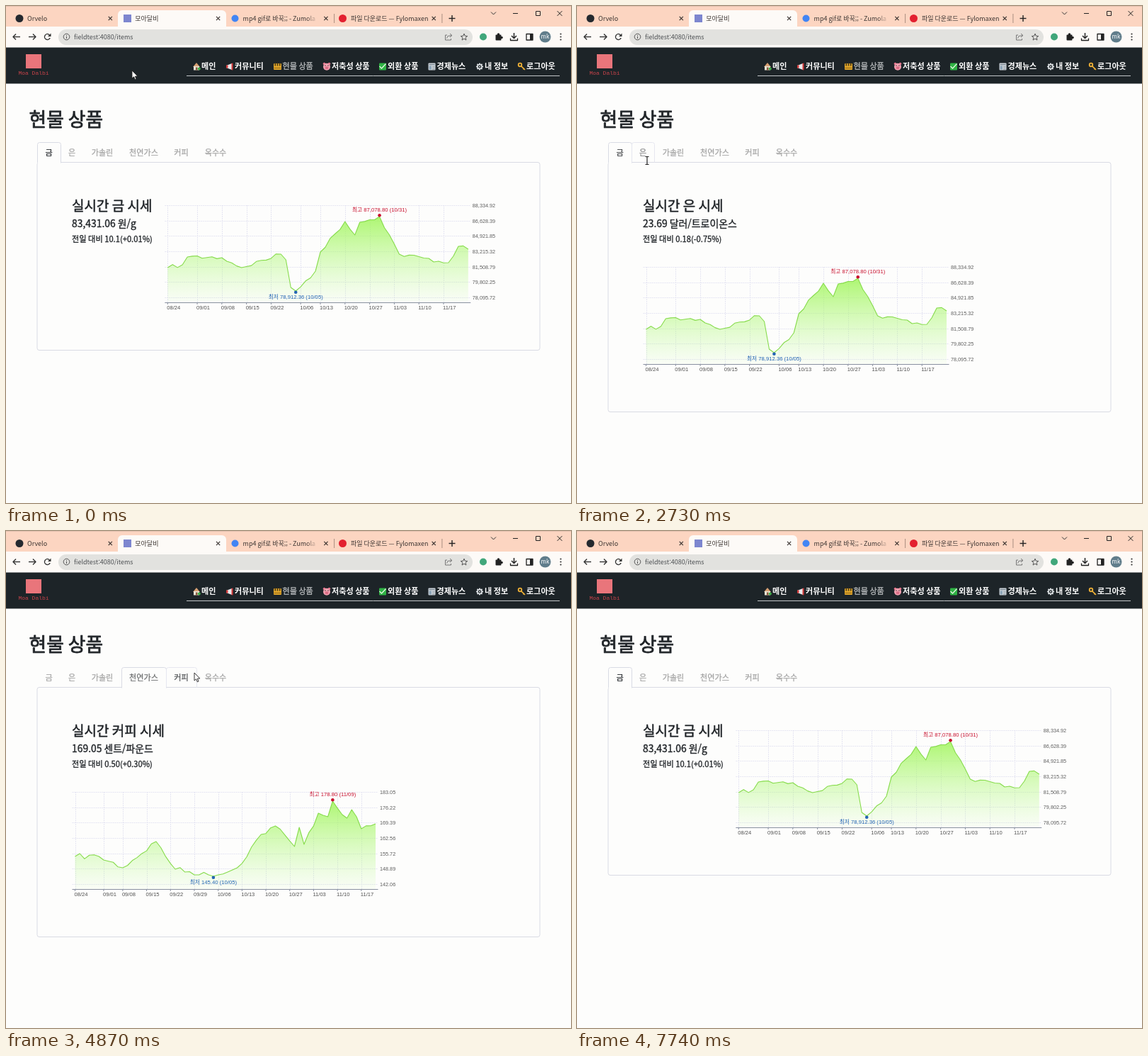
An HTML page with a canvas for the animation above (7780 ms loop, 798x701 px).

```html
<!DOCTYPE html>
<html lang="ko">
<head>
<meta charset="utf-8">
<title>모아달비</title>
<style>
html, body { margin: 0; width: 100%; height: 100%; overflow: hidden; background: #fdfdfc; }
canvas { display: block; width: 798px; height: 701px; }
</style>
</head>
<body>
<canvas id="stage"></canvas>
<script>
const W = 798, H = 701, LOOP = 7780;
const canvas = document.getElementById('stage');
const g = canvas.getContext('2d');
const ratio = window.devicePixelRatio || 1;
canvas.width = W * ratio;
canvas.height = H * ratio;

const KR = '"Noto Sans CJK KR", "Noto Sans CJK", "Noto Sans", sans-serif';
const ARIAL = '"Liberation Sans", "Noto Sans CJK KR", sans-serif';
const INK = '#212529', EDGE = '#d9dbe4', PAPER = '#fdfdfc';

// ---------- drawing helpers ----------
function text(s, x, y, size, color, { font = KR, weight = 400, align = 'left', heft = 0 } = {}) {
  if (font === KR) y -= size * 0.03;
  g.font = `${weight} ${size}px ${font}`;
  g.textAlign = align;
  g.textBaseline = 'middle';
  g.fillStyle = color;
  g.fillText(s, x, y);
  if (heft) {
    g.strokeStyle = color;
    g.lineWidth = heft;
    g.lineJoin = 'round';
    g.strokeText(s, x, y);
  }
}
function box(x, y, w, h, color, r = 0) {
  g.fillStyle = color;
  g.beginPath();
  g.roundRect(x, y, w, h, r);
  g.fill();
}
function dot(x, y, r, color) {
  g.fillStyle = color;
  g.beginPath();
  g.arc(x, y, r, 0, Math.PI * 2);
  g.fill();
}
function ring(x, y, r, color, width = 1, from = 0, to = Math.PI * 2) {
  g.strokeStyle = color;
  g.lineWidth = width;
  g.beginPath();
  g.arc(x, y, r, from, to);
  g.stroke();
}
function trace(pts) {
  g.beginPath();
  for (let i = 0; i < pts.length; i += 2) g.lineTo(pts[i], pts[i + 1]);
}
function line(pts, color, width = 1) {
  trace(pts);
  g.strokeStyle = color;
  g.lineWidth = width;
  g.stroke();
}
function poly(pts, color) {
  trace(pts);
  g.fillStyle = color;
  g.fill();
}
function cross(x, y, r, color, width) {
  line([x - r, y - r, x + r, y + r], color, width);
  line([x - r, y + r, x + r, y - r], color, width);
}

// ---------- browser frame ----------
function drawBrowser() {
  const peach = '#fcd5c1', ink = '#3c3532';
  box(0, 0, W, 29, peach);
  box(0, 0, W, 1, '#e6c2b0');
  box(158, 6, 153, 24, '#fdfaf7', [6, 6, 0, 0]);
  box(0, 29, W, 30, '#fdfaf7');

  dot(19, 17.5, 5.5, '#24292f');
  box(166, 12, 11, 11, '#7d86cf');
  dot(323.5, 17.5, 5, '#4285f4');
  dot(475.5, 17.5, 5.5, '#e3202f');

  const fade = g.createLinearGradient(424, 0, 440, 0);
  fade.addColorStop(0, ink);
  fade.addColorStop(1, peach);
  const titles = ['Orvelo', '모아달비', 'mp4 gif로 바꾹;; - Zumola 검', '파일 다운로드 — Fylomaxen'];
  titles.forEach((title, i) => {
    const x = 30 + i * 152.3;
    text(title, x, 17.5, 9, i === 2 ? fade : ink);
    cross(x + 117.3, 17.5, 2.6, ink, 1.2);
    if (i > 1) line([x + 129, 11, x + 129, 24], '#a98e80');
  });
  line([625.5, 17.5, 634.5, 17.5], '#222', 1.4);
  line([630, 13, 630, 22], '#222', 1.4);

  line([685, 8.5, 688.5, 12, 692, 8.5], '#333');
  line([716, 10.5, 723, 10.5], '#222');
  g.strokeStyle = '#222';
  g.strokeRect(748.5, 7.5, 6, 6);
  cross(782, 10.5, 3.4, '#222', 1);

  for (const [x, d] of [[15, -1], [37, 1]]) {
    line([x - 5 * d, 43.5, x + 4.5 * d, 43.5], '#333', 1.4);
    line([x + d, 39.5, x + 5 * d, 43.5, x + d, 47.5], '#333', 1.4);
  }
  ring(58.5, 43.5, 4, '#333', 1.4, 0.4, 5.5);
  poly([63.5, 38.5, 63.5, 43, 59, 43], '#333');

  box(74, 33, 585, 22, '#e2e2df', 11);
  ring(85.5, 43.5, 4.3, '#555');
  line([85.5, 42.8, 85.5, 46], '#555');
  box(85, 41, 1, 1, '#555');
  text('fieldtest:4080/items', 96, 43.5, 9, '#4c4f52');

  line([623, 41, 620.5, 41, 620.5, 48, 628.5, 48, 628.5, 46], '#777');
  line([622.5, 45.5, 624, 42.5, 629.5, 41.5], '#777');
  line([627, 39, 630, 41.5, 627, 44], '#777');
  const star = [];
  for (let i = 0; i <= 10; i++) {
    const a = i * Math.PI / 5 - Math.PI / 2, r = i % 2 ? 2.2 : 5;
    star.push(647 + r * Math.cos(a), 44 + r * Math.sin(a));
  }
  line(star, '#555');

  dot(674, 43.5, 5, '#41a77b');
  box(691.5, 40.5, 8, 8, '#222', 1);
  dot(695.5, 40, 1.8, '#222');
  dot(700, 44.5, 1.8, '#222');
  line([717.5, 38, 717.5, 45], '#222', 1.5);
  line([714, 42, 717.5, 45.5, 721, 42], '#222', 1.5);
  line([712.5, 45.5, 712.5, 48.5, 722.5, 48.5, 722.5, 45.5], '#222', 1.3);
  g.lineWidth = 1.3;
  g.strokeStyle = '#222';
  g.strokeRect(735, 39.5, 9, 8.5);
  box(740, 39.5, 4, 8.5, '#222');
  dot(761.5, 43.5, 8, '#607d8b');
  text('mk', 761.5, 43.5, 8, '#fff', { align: 'center' });
  for (let i = -1; i < 2; i++) dot(783.5, 43.5 + i * 4, 1.1, '#333');
}

// ---------- site header ----------
const icons = {
  house(x) {
    poly([x - 5, 86, x, 80, x + 5, 86], '#d8a073');
    box(x - 4, 85, 8, 5.5, '#e8e2d4');
    box(x - 1, 86.5, 2.5, 4, '#8b5a3c');
    dot(x + 3.8, 88.5, 2, '#3fae4a');
  },
  horn(x) {
    poly([x - 5, 84, x + 3, 81, x + 3, 90, x - 5, 87], '#e9e9ec');
    box(x - 5, 83.5, 2.5, 4, '#d63a3a');
    box(x + 2.5, 80.5, 2, 10, '#d63a3a', 1);
  },
  crown(x) {
    box(x - 5.5, 81, 11, 9, '#e0a52a', 1);
    for (let i = -1; i < 2; i++) box(x + i * 3.2 - 0.8, 80.5, 1.6, 4, '#4b3a16');
    box(x - 5, 87, 10, 1, '#8d6518');
  },
  pig(x) {
    for (const s of [-1, 1]) dot(x + s * 3.5, 81.5, 1.8, '#e0738a');
    dot(x, 85.8, 5, '#f3a0b0');
    box(x - 2.5, 85.5, 5, 3.4, '#d96b84', 1.7);
    for (const s of [-1, 1]) dot(x + s * 2, 84, 0.7, '#333');
  },
  trend(x) {
    box(x - 5, 80.5, 10, 10, '#2fb344', 1);
    line([x - 4.5, 85, x - 1.5, 88, x + 4.5, 81.5], '#e8f6e6', 1.2);
  },
  news(x) {
    box(x - 5, 80.5, 10, 10, '#cfd6dc', 1);
    box(x - 4, 82, 8, 1.3, '#7b8790');
    box(x - 4, 84.5, 3.5, 5, '#8ea6b8');
    for (let i = 0; i < 3; i++) box(x + 0.5, 85 + 2 * i, 3.5, 0.8, '#8a949b');
  },
  gear(x) {
    for (let a = 0; a < 6; a += Math.PI / 4) dot(x + 4 * Math.cos(a), 85.5 + 4 * Math.sin(a), 1.1, '#dfe3e6');
    ring(x, 85.5, 3, '#dfe3e6', 1.6);
    dot(x, 85.5, 1, '#dfe3e6');
  },
  key(x) {
    ring(x - 2, 83, 2.3, '#eeb036', 1.8);
    line([x - 0.5, 84.7, x + 5, 90], '#eeb036', 1.7);
    line([x + 2.5, 89.5, x + 4, 88], '#eeb036', 1.3);
  }
};
const menu = [
  ['메인', 276, 'house'], ['커뮤니티', 323, 'horn'], ['현물 상품', 390.5, 'crown'], ['저축성 상품', 460, 'pig'],
  ['외환 상품', 539, 'trend'], ['경제뉴스', 608.5, 'news'], ['내 정보', 676, 'gear'], ['로그아웃', 735, 'key']
];
function drawHeader() {
  box(0, 58.5, W, 51, '#1d2428');
  box(28, 68, 22, 20, '#e9757b');
  text('Moa Dalbi', 39, 95, 8, '#c8434a', { font: '"Liberation Mono", monospace', align: 'center' });
  for (const [label, x, icon] of menu) {
    icons[icon](x - 7);
    const here = icon === 'crown';
    text(label, x, 85, 11.1, here ? '#b4b7b9' : '#fff', { weight: here ? 400 : 700, heft: here ? 0.3 : 0 });
  }
  line([255, 98.5, 782, 98.5], '#c3c6c8');
}

// ---------- data ----------
// Trading days from 24 August; Fridays carry the axis labels.
function calendar(count, holidays) {
  const days = [];
  for (const d = new Date(2023, 7, 24); days.length < count; d.setDate(d.getDate() + 1)) {
    const label = [d.getMonth() + 1, d.getDate()].map(v => String(v).padStart(2, '0')).join('/');
    const weekday = d.getDay(), i = days.length;
    if (weekday % 6 === 0 || holidays.includes(label)) continue;
    days.push({ label, tick: i === 0 || (weekday === 5 && i > 1 && i < count - 1) });
  }
  return days;
}
const home = calendar(62, ['09/28', '09/29', '10/02', '10/03', '10/09']);
const world = calendar(64, ['09/04']);

// Daily heights below the top grid line: straight runs between turning points, with seeded noise.
function walk(days, turns, noise) {
  let seed = 7;
  const random = () => (seed = seed * 16807 % 2147483647) / 2147483647;
  const levels = turns.map(p => p[1]);
  const min = Math.min(...levels) + 2, max = Math.max(...levels) - 2;
  return days.map((_, i) => {
    const k = Math.max(1, turns.findIndex(p => p[0] >= i));
    const [i0, y0] = turns[k - 1], [i1, y1] = turns[k];
    const y = y0 + (y1 - y0) * (i - i0) / (i1 - i0);
    if (i === i0 || i === i1) return y;
    return Math.min(max, Math.max(min, y + (random() * 2 - 1) * noise));
  });
}

const goods = [
  { name: '금', price: '83,431.06 원/g', diff: '10.1(+0.01%)', days: home, noise: 3,
    top: 88334.92, low: 78095.72, hi: '87,078.80', lo: '78,912.36',
    turns: [[0, 88], [3, 84], [4, 73], [11, 74], [15, 88], [23, 69], [24, 77], [25, 116], [26, 121], [30, 93],
      [31, 66], [36, 23], [38, 42], [39, 24], [43, 16], [47, 69], [57, 81], [59, 58], [61, 62]] },
  { name: '은', price: '23.69 달러/트로이온스', diff: '0.18(-0.75%)', days: world, noise: 3,
    top: 25.64, low: 20.61, hi: '25.10', lo: '21.02',
    turns: [[0, 36], [2, 35], [4, 14], [9, 62], [14, 67], [20, 47], [25, 83], [26, 109], [29, 120], [30, 102],
      [34, 93], [35, 71], [40, 57], [48, 74], [51, 62], [55, 88], [59, 44], [63, 51]] },
  { name: '가솔린', price: '1,650.91 원/리터', diff: '2.05(-0.12%)', days: home, noise: 1,
    top: 1818.31, low: 1636.42, hi: '1,796.00', lo: '1,650.91',
    turns: [[0, 59], [26, 16], [40, 60], [61, 120]] },
  { name: '천연가스', price: '2.90 달러/MMBtu', diff: '0.06(+2.18%)', days: world, noise: 6,
    top: 3.74, low: 2.38, hi: '3.58', lo: '2.49',
    turns: [[0, 100], [9, 120], [24, 85], [32, 50], [39, 70], [48, 16], [63, 75]] },
  { name: '커피', price: '169.05 센트/파운드', diff: '0.50(+0.30%)', days: world, noise: 4,
    top: 183.051, low: 142.06, hi: '178.80', lo: '145.40',
    turns: [[0, 91], [5, 91], [10, 107], [17, 70], [21, 109], [29, 119], [34, 107], [39, 60], [42, 48], [46, 77],
      [47, 50], [48, 74], [51, 30], [53, 35], [54, 13], [57, 37], [58, 25], [60, 52], [63, 45]] },
  { name: '옥수수', price: '487.75 센트/부셸', diff: '1.25(-0.26%)', days: world, noise: 6,
    top: 511.649, low: 459.899, hi: '505.00', lo: '464.00',
    turns: [[0, 59], [2, 39], [5, 84], [9, 64], [16, 101], [24, 59], [25, 88], [28, 65], [29, 36], [32, 66],
      [34, 39], [37, 57], [39, 18], [43, 69], [49, 105], [50, 86], [55, 120], [56, 87], [60, 112], [63, 61]] }
];
let edge = 44;
for (const item of goods) {
  item.left = Math.round(edge);
  item.right = Math.round(edge += 22.4 + 10.3 * item.name.length);
  item.ys = walk(item.days, item.turns, item.noise);
}

// ---------- chart ----------
const money = v => v.toLocaleString('en-US', { minimumFractionDigits: 2, maximumFractionDigits: 2 });

function mark(x, y, label, color, side, left) {
  dot(x, y + side * 1.8, 2.3, color);
  g.font = `7.7px ${ARIAL}`;
  const half = g.measureText(label).width / 2;
  text(label, Math.max(x, left + 28.5 + half), y + side * 9, 7.7, color, { font: ARIAL, align: 'center' });
}
function drawChart({ ys, days, top, low, hi, lo }, x, y) {
  const n = ys.length - 1, base = y + 137;
  const px = i => x + 4 + 424.5 * i / n;

  g.setLineDash([2, 1]);
  for (let i = 0; i < 7; i++) {
    const gy = Math.round(y + i * 21.67) + 0.5;
    line([x, gy, x + 432, gy], '#e5e5f2');
  }
  days.forEach((day, i) => {
    const gx = Math.round(px(i)) + 0.5;
    if (day.tick) line([gx, y, gx, base], '#e5e5f2');
  });
  g.setLineDash([]);

  const curve = ys.flatMap((v, i) => [px(i), y + v]);
  const fill = g.createLinearGradient(0, y + Math.min(...ys), 0, base);
  fill.addColorStop(0, 'rgba(160,245,90,.85)');
  fill.addColorStop(1, 'rgba(190,250,150,.06)');
  poly([...curve, px(n), base, px(0), base], fill);
  g.lineJoin = 'round';
  line(curve, '#86db4b', 1.1);
  line([x, base + 0.5, x + 432, base + 0.5], '#8990a0', 1.2);

  for (let i = 0; i < 7; i++) {
    text(money(top - (top - low) * i / 6), x + 434.5, y + 1 + i * 21.67, 7.25, '#5d5d5d', { font: ARIAL });
  }
  days.forEach((day, i) => {
    if (!day.tick) return;
    line([px(i), base, px(i), base + 3], '#8990a0');
    text(day.label, px(i) - 1, y + 145.3, 7.6, '#505050', { font: ARIAL });
  });

  const a = ys.indexOf(Math.min(...ys)), b = ys.indexOf(Math.max(...ys));
  mark(px(a), y + ys[a], `최고 ${hi} (${days[a].label})`, '#c8102e', -1, x);
  mark(px(b), y + ys[b], `최저 ${lo} (${days[b].label})`, '#2464b4', 1, x);
}

// ---------- state ----------
const clicks = [2710, 3480, 4130, 4790, 5380, 6040];
const pageAt = t => clicks.filter(at => t >= at).length % goods.length;

const path = [
  [0, 178, 91], [1400, 130, 184], [1730, 126, 192], [2730, 99, 218], [3500, 143, 212],
  [4200, 195, 207], [4870, 266, 200], [5400, 293, 205], [6000, 52, 203], [6330, 52, 204]
];
function cursorAt(t) {
  const k = path.findIndex(p => p[0] > t);
  if (k < 0) return null;
  const [t0, x0, y0] = path[k - 1], [t1, x1, y1] = path[k];
  const u = (t - t0) / (t1 - t0), e = u * u * (3 - 2 * u);
  return { x: x0 + (x1 - x0) * e, y: y0 + (y1 - y0) * e, beam: t > 1530 && t < 3700 };
}
function drawCursor({ x, y, beam }) {
  if (beam) {
    line([x, y - 5, x, y + 5], '#222', 1.2);
    for (const d of [-5.5, 5.5]) line([x - 2.5, y + d, x + 2.5, y + d], '#222');
    return;
  }
  const shape = [0, 0, 0, 11, 2.6, 8.8, 4.3, 12.8, 6, 12, 4.4, 8.2, 7.8, 8, 0, 0]
    .map((v, i) => v + (i % 2 ? y : x));
  poly(shape, '#fff');
  line(shape, '#222', 0.9);
}

// ---------- page ----------
function tabShape(left, right, bottom, color) {
  g.strokeStyle = color;
  g.lineWidth = 1;
  g.beginPath();
  g.moveTo(left + 0.5, bottom);
  g.arcTo(left + 0.5, 192.5, left + 3.5, 192.5, 3);
  g.arcTo(right + 0.5, 192.5, right + 0.5, 196, 3);
  g.lineTo(right + 0.5, bottom);
  g.stroke();
}
// Tab label colour eases over 150 ms after each click.
function tabColor(i, t) {
  let lit = 0;
  for (let k = 0; k < 10; k++) if (pageAt(t - k * 15) === i) lit += 0.1;
  const [r, gr, b] = [[163, 33], [163, 37], [163, 41]].map(([off, on]) => Math.round(off + (on - off) * lit));
  return `rgb(${r},${gr},${b})`;
}
function drawTabs(t, cursor) {
  const active = pageAt(t - 100);
  goods.forEach(({ left, right, name }, i) => {
    const hover = cursor && cursor.x > left && cursor.x < right && cursor.y > 193 && cursor.y < 220;
    if (i === active) {
      box(left, 192, right - left, 30, PAPER, [3, 3, 0, 0]);
      tabShape(left, right, 221.5, EDGE);
    } else if (hover) {
      tabShape(left, right, 220.5, '#e6e7f0');
    }
    text(name, (left + right) / 2, 207, 11.1, tabColor(i, t), { align: 'center', heft: 0.25 });
  });
}

function render(t) {
  const page = pageAt(t), item = goods[page], stacked = page !== 0;
  const chart = goods[pageAt(t - 50)], cursor = cursorAt(t);

  g.setTransform(ratio, 0, 0, ratio, 0, 0);
  box(0, 0, W, H, PAPER);
  drawBrowser();
  drawHeader();

  text('현물 상품', 32.5, 161, 26.8, INK, { heft: 0.8 });
  g.strokeStyle = EDGE;
  g.lineWidth = 1;
  g.beginPath();
  g.roundRect(44, 220.5, 710, stacked ? 352 : 265, 3);
  g.stroke();
  drawTabs(t, cursor);

  text(`실시간 ${item.name} 시세`, 93, 282, 19, INK, { heft: 0.5 });
  text(item.price, 93, 307, 13.9, INK, { heft: 0.35 });
  text('전일 대비 ' + item.diff, 93, 329, 11.2, INK, { heft: 0.3 });
  if (stacked) drawChart(chart, 93.5, 368);
  else drawChart(chart, 224.3, 281);

  if (cursor) drawCursor(cursor);
}

const start = performance.now();
function frame() {
  render((performance.now() - start) % LOOP);
  requestAnimationFrame(frame);
}
frame();
</script>
</body>
</html>
```
